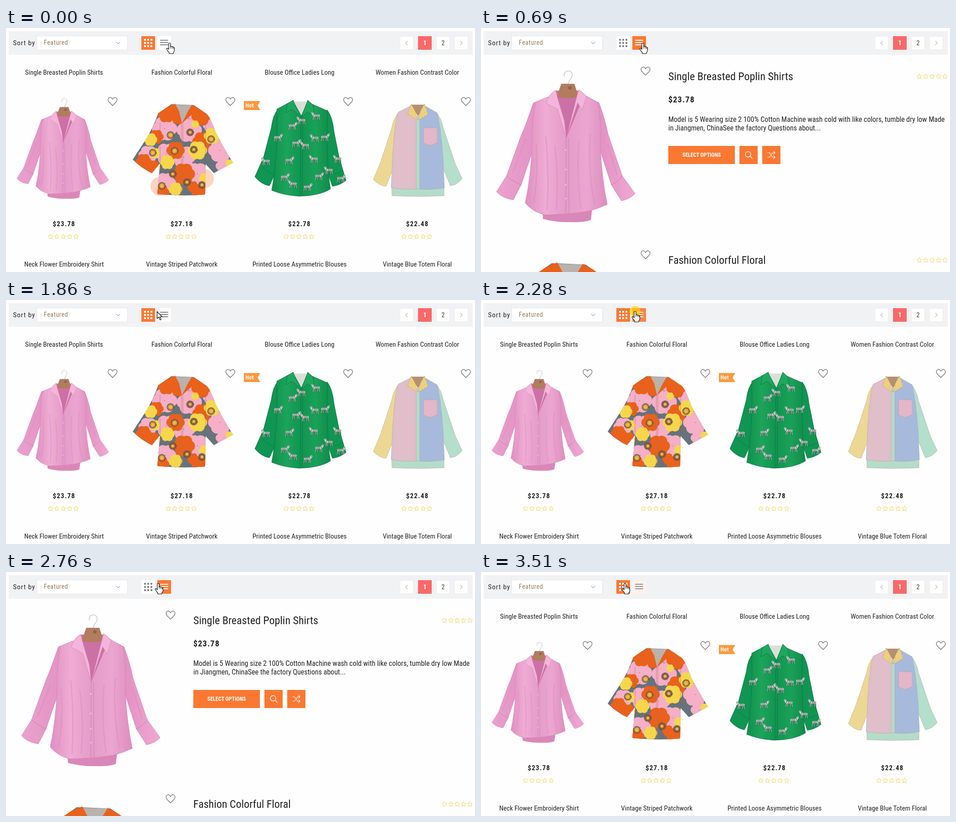
An HTML page that plays this animation: 1029 by 538 pixels, repeating every 3.58 s.

```html
<!DOCTYPE html>
<html lang="en">
<head>
<meta charset="utf-8">
<title>Product list view switch</title>
<style>
html, body { margin: 0; width: 100%; height: 100%; overflow: hidden; background: #fefefe; }
svg { display: block; font-family: "Roboto Condensed", Roboto, sans-serif; font-stretch: 75%; }
.line { fill: none; stroke-linecap: round; stroke-linejoin: round; }
</style>
</head>
<body>
<svg id="stage" width="1029" height="538" viewBox="0 0 1029 538"></svg>
<script>
const ORANGE = '#fa7832';
const stage = document.getElementById('stage');

// Markup helpers
const path = (d, fill, extra = '') => `<path d="${d}" fill="${fill}" ${extra}/>`;
const line = (d, color, width = 1, extra = '') => `<path class="line" d="${d}" stroke="${color}" stroke-width="${width}" ${extra}/>`;
const rect = (x, y, w, h, fill, extra = '') => `<rect x="${x}" y="${y}" width="${w}" height="${h}" fill="${fill}" ${extra}/>`;
const disc = (x, y, r, fill, extra = '') => `<circle cx="${x}" cy="${y}" r="${r}" fill="${fill}" ${extra}/>`;
const group = (content, transform, extra = '') => `<g transform="${transform}" ${extra}>${content}</g>`;
const text = (x, y, size, str, extra = '') => `<text x="${x}" y="${y}" font-size="${size}" fill="#232323" ${extra}>${str}</text>`;
const middle = 'text-anchor="middle"';
const use = (id, x, y) => `<use href="#${id}" x="${x}" y="${y}"/>`;
const stars = (x, y) => [0, 1, 2, 3, 4].map(i => use('star', x + i * 14, y)).join('');

const starPoints = [...Array(10)].map((_, i) => {
  const r = i % 2 ? 2.7 : 5.6, a = (i / 5 - .5) * Math.PI;
  return `${(r * Math.cos(a)).toFixed(2)},${(r * Math.sin(a)).toFixed(2)}`;
}).join(' ');

const gradient = (id, ...colors) => `<linearGradient id="${id}">${colors.map((c, i) =>
  `<stop offset="${i / (colors.length - 1)}" stop-color="${c}"/>`).join('')}</linearGradient>`;
const stripes = (id, base, color) => `<pattern id="${id}" width="3" height="8" patternUnits="userSpaceOnUse">
  ${rect(0, 0, 3, 8, base)}${rect(0, 0, 1, 8, color)}</pattern>`;

function pinkShirt() {
  const edge = 'stroke="#d182b4" stroke-width=".8"';
  return line('M183 106C179 94 199 89 200 103C201 112 192 112 192 124', '#d3d3d6', 2) +
    path('M144 155L115 165C105 192 98 215 88 237L56 326L34 361Q48 376 71 379L88 346L112 275L128 190Z', 'url(#pinkL)', edge) +
    path('M230 150L259 165Q273 203 279 235L310 326L338 365Q328 377 308 381L286 346L263 275L246 190Z', 'url(#pinkR)', edge) +
    path('M134 395L136 421Q165 429 197 428Q228 429 241 423L244 398Z', '#d987b8') +
    path('M146 152L120 163Q112 195 112 255Q110 325 97 386Q114 406 140 412Q190 411 213 407Q243 405 277 389Q265 330 262 265Q264 200 256 164L228 148Z', 'url(#pink)', edge) +
    path('M164 138L214 138L218 168L187 243L166 165Z', '#cb71a6') +
    path('M176 123L205 123L214 152Q190 158 166 152Z', '#b27c5e') + disc(195, 132, 4, '#94644b') +
    path('M164 137Q149 145 143 166L168 179L187 243L183 205L168 154Z', '#f3b5d9', edge) +
    path('M214 136Q226 143 231 152L222 181L212 165L187 243L209 156Z', '#f3b5d9', edge) +
    line('M187 243L186 412M192 243L193 411', '#d182b4') +
    [269, 312, 346, 376].map(y => disc(186, y, 1.6, '#f6cfe4')).join('') +
    line('M56 326Q70 338 88 346M310 326Q301 339 286 346', '#ca79ac') +
    line('M121 255Q126 330 115 385M142 240Q150 320 145 400M162 260Q171 335 165 400M215 250Q209 320 219 398M240 235Q234 310 249 388M98 245L70 318M277 255L298 322', '#d98abb', 3, 'opacity=".45"');
}

function floralShirt() {
  const orange = '#ea611b', pink = '#f5afc6', yellow = '#f6d74b';
  const blooms = [
    [pink, [348, 222, 26, 402, 225, 26, 352, 278, 23, 400, 185, 15, 470, 270, 25, 312, 280, 20, 390, 285, 24, 350, 342, 22, 420, 322, 24, 478, 304, 17, 448, 215, 15]],
    [orange, [352, 190, 18, 330, 240, 15, 377, 198, 14, 428, 195, 20, 372, 270, 19, 302, 294, 16, 322, 308, 16, 390, 322, 23, 340, 362, 17, 425, 362, 17, 430, 250, 20, 410, 350, 12]],
    [yellow, [420, 270, 20, 354, 296, 15, 452, 238, 17, 317, 246, 14, 372, 355, 14, 415, 212, 8, 436, 332, 12, 327, 276, 11, 490, 298, 8]]
  ];
  const bloom = (color, x, y, r) => [0, 1, 2, 3, 4, 5].map(i =>
    disc(x + r * .55 * Math.cos(i * 1.05), y + r * .55 * Math.sin(i * 1.05), r * .52, color)).join('');
  const daisies = [[361, 236], [404, 230], [370, 271], [412, 268], [322, 275], [366, 322], [342, 348], [430, 346], [450, 245], [397, 340]];
  return `<g clip-path="url(#floralCut)">` + rect(275, 160, 226, 215, '#66737b') +
    blooms.map(([color, p]) => p.map((x, i) => i % 3 ? '' : bloom(color, x, p[i + 1], p[i + 2])).join('')).join('') +
    daisies.map(([x, y], i) => disc(x, y, 7, i % 2 ? '#9a6a3c' : '#d8a33c', 'stroke="#5f4c45" stroke-width="3" stroke-dasharray="2 1"') +
      disc(x, y, 3, '#f0bc4d')).join('') +
    path('M371 169L408 170L400 190L386 210Z', '#b9b2ad') +
    line('M385 208V370M388 208V370', '#bd6e54', .7) +
    line('M338 210V300M438 210V300', '#8d5548', .8, 'opacity=".6"') + '</g>' +
    path('M371 167L360 171L354 192L371 184L386 210L380 184Z', orange) +
    path('M408 169L424 178L430 193L412 187L386 210L400 182Z', orange);
}

function greenShirt() {
  const edge = 'stroke="#08733f" stroke-width=".8"';
  const zebras = [629, 217, 680, 195, 637, 255, 656, 260, 622, 293, 675, 290, 597, 243, 570, 295, 612, 330, 629, 345, 687, 328, 708, 315, 662, 352, 677, 244, 700, 242, 728, 290, 735, 333, 648, 205];
  return path('M600 177Q586 187 582 220L565 285L546 328Q560 345 578 348L598 305Z', '#109552', edge) +
    path('M704 180Q716 193 720 230L731 285L746 336Q733 347 716 349L699 300Z', '#109552', edge) +
    path('M620 165L594 179Q597 280 583 358Q610 369 643 371Q688 370 712 355Q702 300 706 183L672 168Z', 'url(#green)', edge) +
    path('M631 162L661 162L648 193Z', '#d8e0d8') +
    path('M630 159L617 167L614 187L628 179L648 197L634 169Z', '#1fa65d', edge) +
    path('M662 159L673 169L677 193L661 185L648 197L657 173Z', '#1fa65d', edge) +
    line('M647 197L645 370M651 197L650 370', '#08733f', .7) +
    line('M561 305Q572 318 589 324M710 321Q725 324 738 315', '#08733f', .7) +
    zebras.map((x, i) => i % 2 ? '' : group(use('zebra', 0, 0), `translate(${x} ${zebras[i + 1]}) scale(${i % 4 ? -1 : 1} 1)`)).join('');
}

function blockShirt() {
  const edge = 'stroke="#a9a6a0" stroke-width=".6"';
  return path('M846 348L847 370Q905 373 961 370L961 348Z', '#b5dcc9', edge) +
    path('M862 186Q850 198 846 222L822 295L806 334Q818 348 834 349L851 305Z', 'url(#yellowStripe)', edge) +
    path('M944 186Q955 198 960 222L986 300L1001 332Q990 346 975 348L957 305Z', 'url(#mintStripe)', edge) +
    path('M887 172L860 186Q851 220 848 290L845 352Q872 357 901 355V195Z', 'url(#pinkStripe)', edge) +
    path('M920 172L946 187Q955 225 959 290L962 352Q935 358 907 355V195Z', 'url(#blueStripe)', edge) +
    rect(900, 195, 8, 160, '#b4d9c9', edge) +
    path('M889 169L919 169L904 195Z', '#b58f72') +
    path('M889 167L881 189L892 197L904 203L898 184Z', '#edcf7c', edge) +
    path('M918 167L926 190L914 198L904 203L909 184Z', '#edcf7c', edge) +
    path('M916 220H946V253L931 259L916 254Z', '#e3b6c8', edge);
}

const defs = `<defs>
  ${gradient('pink', '#df8fc0', '#efacd4', '#e49bc8', '#eba6d0', '#dd8dbe')}
  ${gradient('pinkL', '#eaa2cd', '#e18fc2')}${gradient('pinkR', '#dd88bb', '#f0a9d3')}
  ${gradient('green', '#0f8f4d', '#1ca45b', '#119451', '#1aa159', '#0e8b4a')}
  ${stripes('yellowStripe', '#f0dc9b', '#e6ce85')}${stripes('mintStripe', '#b9e3d1', '#a6d6c2')}
  ${stripes('pinkStripe', '#e4c3cf', '#d7b3c1')}${stripes('blueStripe', '#adbfe0', '#9aafd5')}
  <clipPath id="floralCut"><path d="M363 168L334 188Q322 222 304 250L278 290Q297 309 320 320L338 298L332 366Q385 372 437 367L438 300L456 320L498 297Q475 260 460 230Q450 200 441 190L412 170Z"/></clipPath>
  <g id="zebra">${line('M-7 -1H5L8 -7M-6 0V8M-3 1V7M3 0V8M5 0V7', '#3a5547', 1.6)}
    ${line('M-6 -2H4L8 -7', '#c9cdc9', 5)}${line('M-6 -4L-5 0M-3 -5L-2 1M0 -5L1 1M4 -6L5 -1M7 -9L9 -6', '#4b5952', 1)}
    ${line('M-7 1L-8 7M-4 1V7M3 1V7M5 0L6 7', '#c9cdc9', 1)}</g>
  <polygon id="star" points="${starPoints}" fill="none" stroke="#f8d557" stroke-width="1" stroke-linejoin="round"/>
  <path id="heart" class="line" d="M0 9L-8 1C-14 -7 -4 -13 0 -5C4 -13 14 -7 8 1Z" stroke="#6d6d6d" stroke-width="1.3"/>
  <g id="pink-shirt">${pinkShirt()}</g>
  <g id="floral-shirt">${floralShirt()}</g>
</defs>`;

// Toolbar
const dots = color => [0, 1, 2].map(r => [0, 1, 2].map(c => rect(303 + c * 7, 24 + r * 7, 4, 4, color)).join('')).join('');
const bars = color => [27, 32, 37].map(y => line(`M339 ${y}H355`, color, 2)).join('');
const toggle = (id, x, icon) => rect(x, 18, 30, 30, '#fff') + icon('#858585') +
  `<g id="${id}">${rect(x, 18, 30, 30, ORANGE)}${icon('#fff')}</g>`;
const page = (x, label, on) => rect(x + .5, 18.5, 29, 29, on ? '#f96868' : '#fff', `stroke="${on ? '#f96868' : '#ececec'}"`) +
  text(x + 15, 38, 14, label, `${middle} font-weight="${on ? 700 : 400}" style="fill:${on ? '#fff' : '#4c3c20'}"`);
const toolbar = rect(6, 7, 1018, 52, '#f1f2f4') +
  text(15.5, 38, 15, 'Sort by', 'letter-spacing="1"') +
  rect(67.5, 17.5, 199, 31, '#fff', 'stroke="#e2e5e6"') +
  text(83, 37, 14, 'Featured', 'letter-spacing=".6" style="fill:#957a56"') +
  line('M242 31L246 35L250 31', '#777') +
  toggle('gridOn', 297, dots) + toggle('listOn', 332, bars) +
  page(864, '') + page(904, '1', true) + page(944, '2') + page(984, '') +
  line('M881 29L877 33L881 37M997 29L1001 33L997 37', '#a5875b');

// Grid view
const products = [
  ['Single Breasted Poplin Shirts', '$23.78', 'Neck Flower Embroidery Shirt'],
  ['Fashion Colorful Floral', '$27.18', 'Vintage Striped Patchwork'],
  ['Blouse Office Ladies Long', '$22.78', 'Printed Loose Asymmetric Blouses'],
  ['Women Fashion Contrast Color', '$22.48', 'Vintage Blue Totem Floral']
];
const grid = products.map(([name, price, next], i) => {
  const x = 127.3 + i * 258.4;
  return text(x, 103, 15, name, middle) + text(x, 437, 15, price, `${middle} font-weight="700" letter-spacing="1.2"`) +
    stars(x - 29.5, 460) + text(x, 526, 15, next, middle) + use('heart', x + 106.5, 162);
}).join('') +
  group(use('pink-shirt', 0, 0), 'translate(1.3 92.7) scale(.663)') +
  `<g id="hover" fill-opacity=".55">${disc(338, 349, 21, '#f9b48e')}${disc(435, 332, 21, '#f9b48e')}</g>` +
  use('floral-shirt', 0, 0) + greenShirt() + blockShirt() +
  path('M522 161H558L552 171L558 181H522Z', '#f99a3f') +
  text(525.5, 175, 12, 'Hot', 'font-weight="700" letter-spacing=".4" style="fill:#fff"');

// List view
const details = text(411, 115, 24, products[0][0]) + stars(962, 107) +
  text(411, 164, 18, '$23.78', 'font-weight="700" letter-spacing="1.2"') +
  text(411, 207, 16, 'Model is 5 Wearing size 2 100% Cotton Machine wash cold with like colors, tumble dry low Made') +
  text(411, 226, 16, 'in Jiangmen, ChinaSee the factory Questions about...') +
  rect(411, 260, 146, 40, ORANGE) + rect(567, 260, 40, 40, ORANGE) + rect(617, 260, 40, 40, ORANGE) +
  text(484, 284, 12, 'SELECT OPTIONS', `${middle} font-weight="700" style="fill:#fff"`) +
  line('M591 283L595 288M592 278.5a6 6 0 1 1-12 0a6 6 0 1 1 12 0', '#fff', 1.3) +
  line('M629 275H633L640 285H645M629 285H633L640 275H645M642 272L645 275L642 278M642 282L645 285L642 288', '#fff', 1.2) +
  text(411, 520, 24, products[1][0]) + stars(962, 512);
const list = use('pink-shirt', 0, 0) + group(use('floral-shirt', 0, 0), 'translate(-391.9 265.2) scale(1.508)') +
  use('heart', 361, 95) + use('heart', 361, 500) + `<g id="details">${details}</g>`;

// Pointers, drawn with the hotspot at the origin
const outline = 'stroke="#111" stroke-width="1.2" stroke-linejoin="round"';
const hand = path('M-2 2Q-2 0 0 0Q2 0 2 2V8Q4 6.500 5.500 8.500Q7.500 7.500 8.500 9.500Q10.500 9 10.500 12V16Q10 19 8 21V23.500H-1V21Q-4 18 -6.500 13.500Q-6.500 10.500 -4 12L-2 14Z', '#fff', outline) +
  line('M2 8V12M5.500 9V12M8.500 10V13', '#111');
const arrow = path('M.5 .5V16L4 12.500L7 19L9.500 18L6.500 12H11.500Z', '#fff', outline);

stage.innerHTML = defs + toolbar + `<g id="grid">${grid}</g><g id="list">${list}</g>` +
  `<g id="cursor">${disc(0, 0, 12, '#ffd400', 'id="press" opacity=".65"')}<g id="hand">${hand}</g><g id="arrow">${arrow}</g></g>`;
const part = Object.fromEntries([...stage.querySelectorAll('g[id], #press')].map(e => [e.id, e]));

// Timelines: [ms, value] with smooth steps between
const tracks = {
  gridOn: [[381, 1], [681, 0], [890, 0], [1150, 1], [2392, 1], [2692, 0], [2930, 0], [3180, 1]],
  listOn: [[60, 0], [340, 1], [1583, 1], [1880, 0], [2030, 0], [2330, 1], [3260, 1], [3570, 0]],
  shift: [[381, 30], [581, 0], [1700, 0], [1700, 30], [2392, 30], [2592, 0]],
  x: [[590, 359], [1100, 316], [1600, 316], [2019, 338], [2650, 338], [3095, 313], [3240, 313], [3500, 316]],
  y: [[590, 33], [1100, 29], [1600, 29], [1800, 25]]
};
function valueAt(track, t) {
  const i = track.findIndex(k => t < k[0]);
  if (i < 0) return track[track.length - 1][1];
  if (!i) return track[0][1];
  const [t0, a] = track[i - 1], [t1, b] = track[i], p = (t - t0) / (t1 - t0);
  return a + (b - a) * p * p * (3 - 2 * p);
}
const show = (name, on) => part[name].setAttribute('display', on ? 'inline' : 'none');

const LOOP = 3580, STEP = 68.9;
function draw(now) {
  const step = Math.floor((now % LOOP + 6) / STEP), t = step * STEP;
  const within = (...ranges) => ranges.some(([a, b]) => step >= a && step < b);
  const at = name => valueAt(tracks[name], t);
  const listView = within([5, 24], [35, 48]);
  show('list', listView);
  show('grid', !listView);
  show('hover', step === 0);
  show('press', within([3, 5], [20, 23], [32, 34], [45, 47]));
  part.gridOn.setAttribute('opacity', at('gridOn'));
  part.listOn.setAttribute('opacity', at('listOn'));
  const shift = Math.round(at('shift')), x = Math.round(at('x')), y = Math.round(at('y'));
  part.details.setAttribute('transform', `translate(${-shift} ${shift})`);
  part.details.setAttribute('opacity', 1 - shift / 250);
  part.cursor.setAttribute('transform', `translate(${x} ${y})`);
  const between = x >= 327 && x < 332;
  show('arrow', between);
  show('hand', !between);
  requestAnimationFrame(() => draw(performance.now()));
}
draw(0);
</script>
</body>
</html>
```
